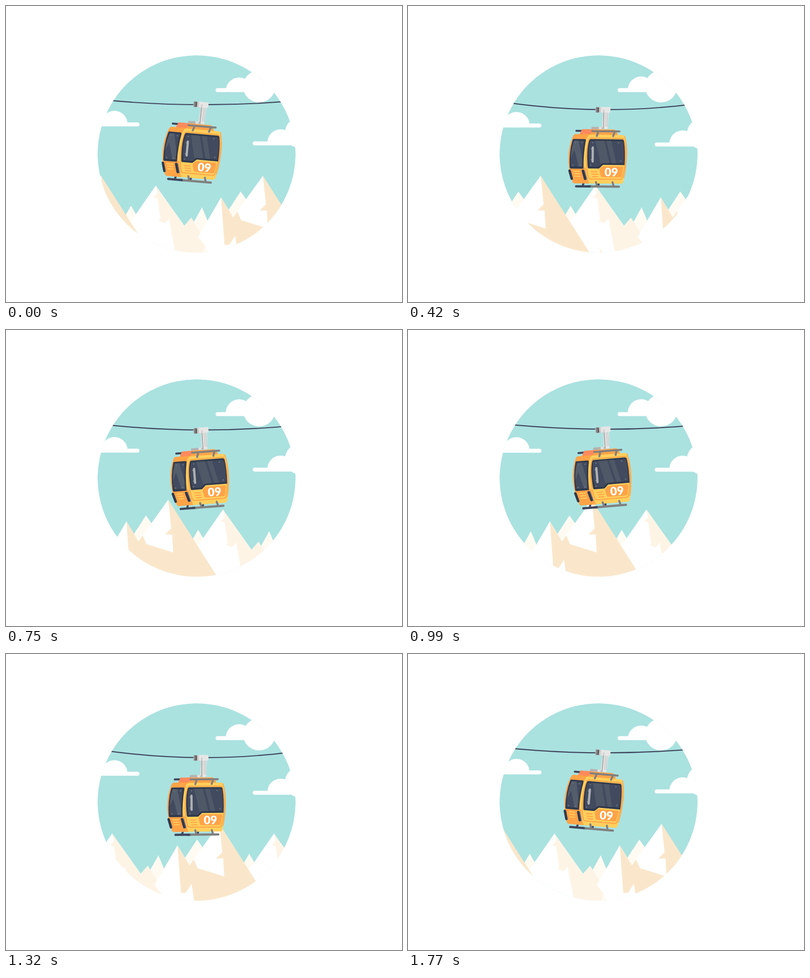
An HTML page for the animation above (1.8 s loop, 800 by 600 pixels).

```html
<!DOCTYPE html>
<html lang="en">
<head>
<meta charset="utf-8">
<title>Gondola</title>
<style>
html, body { margin: 0; width: 100%; height: 100%; overflow: hidden; background: #fff; }
svg { display: block; width: 800px; height: 600px; }
.l { fill: none; stroke-linecap: round; stroke-linejoin: round; }
</style>
</head>
<body>
<svg viewBox="0 0 800 600">
  <defs>
    <clipPath id="disc"><circle cx="385" cy="300" r="200"/></clipPath>
    <clipPath id="sideGlass"><path d="M336 273H356.5Q352.5 300 352.5 326H330.5Q327.5 298 336 273Z"/></clipPath>
    <clipPath id="frontGlass"><path d="M371 273H431.5Q435 273 435.700 278Q438 300 436.500 318.500H393.500L385.500 326H368.500Q363 299 368 276Q368.800 273 371 273Z"/></clipPath>
    <g id="far">
      <path fill="#fffbf3" d="M252.500 405L229 445H276ZM474 376L420 459H532ZM396 408L345 500H434Z"/>
      <path fill="#fff" d="M302.500 364L205 505H398L360 445Z"/>
      <path fill="#fef4e6" d="M302.500 364L360 445.500L374.500 429L395 462L402 485L396 505H343L329 431L321.500 440.500L309 436L312 431L306 390L298 388L306 379ZM310.500 488L316.500 500H312Z"/>
    </g>
    <g id="near">
      <path fill="#fff" d="M519 344L459 428L434.500 388L388 468L402 486L411 505H560Z"/>
      <path fill="#fae7cb" d="M519 344L621 505H469L463 466L451 484H441.500L434.500 388L459 428.500L467.500 416.500L475 434L529 451L527 414.500H512.500L525 402Z"/>
    </g>
  </defs>

  <g clip-path="url(#disc)">
    <circle cx="385" cy="300" r="200" fill="#aae2e0"/>
    <g id="mountains"></g>
    <g fill="#fff">
      <rect x="423.500" y="166.500" width="140" height="8" rx="4"/>
      <path d="M470 160H545V174H470Z"/>
      <circle cx="511.500" cy="163" r="32.500"/>
      <path id="puff" d="M444 172a27 27 0 0 1 54 0z"/>
      <g id="clouds">
        <rect x="150" y="236" width="119.500" height="8" rx="4"/>
        <path d="M192.500 239a26.500 26.500 0 0 1 53 0z"/>
        <rect x="498.500" y="274.500" width="120" height="8" rx="4"/>
        <path d="M528 277a27 27 0 0 1 54 0z"/>
        <circle cx="595" cy="257" r="31.500"/>
        <path d="M565 262H600V282H565Z"/>
      </g>
    </g>
    <path id="cable" class="l" stroke="#3f465c" stroke-width="2.200"/>
  </g>

  <g id="cabin">
    <!-- hanger -->
    <path fill="#e6e6e6" d="M393.500 214H405.500L404 249H392Z"/>
    <path fill="#b3b3b3" d="M394 210H397L396.500 249H391.500V246H394Z"/>
    <path class="l" stroke="#b8b8b8" stroke-width="1" d="M400 213V244M403 213V244"/>
    <rect x="378.500" y="205" width="12" height="11" rx="1.500" fill="#b3b3b3"/>
    <path fill="#808080" d="M380 205H384V216H380Z"/>
    <path fill="#4d4d4d" d="M383.500 205.500H385.500V215.500H383.500Z"/>
    <rect x="387.500" y="204.500" width="21.500" height="11.500" rx="1" fill="#e6e6e6"/>
    <path fill="#cfcfcf" d="M387.500 205H390V216H387.500ZM394 210H397V216H394Z"/>
    <rect x="371" y="245" width="16" height="6" rx="1.500" fill="#b3b3b3"/>
    <path fill="#e0e0e0" d="M386 245H392V250H386Z"/>

    <!-- roof -->
    <path class="l" stroke="#3f465c" stroke-width="4" d="M340.500 253.500H354"/>
    <path fill="#ff8a5c" d="M352 250H376L372 261H347Z"/>
    <path fill="#ffa347" d="M374 250H416Q419 250 421 253L425 262H368Z"/>

    <!-- landing skid -->
    <g class="l" stroke-width="4">
      <path stroke="#3f465c" d="M356.500 358L354.500 364M387 358L386 364"/>
      <path stroke="#3f465c" stroke-width="4.500" d="M341 366H372"/>
      <path stroke="#808080" stroke-width="4.500" d="M372 366H427.500"/>
      <path fill="#3f465c" stroke="none" d="M364 363.750H370V368.250H364Z"/>
    </g>

    <!-- shell -->
    <path fill="#ffa347" d="M339 260H372L366 360H337Q334.500 360 333 355Q325 331 325 310Q325 284 334 264Q336 260 339 260Z"/>
    <path fill="#ffcf5c" d="M369 261H433Q437 261 438.500 265Q443 284 442.500 305Q442 334 436 356Q435 360 431 360H362Q358 345 357 328Q354 290 363 266Q365 261 369 261Z"/>
    <path fill="#ffa347" d="M357 328L362 360H367Q361 343 360 328Z"/>
    <path class="l" stroke="#ffa347" stroke-width="2" d="M362 328Q364 343 366 348Q367 351 370 351H430Q433 351 434 348Q440 325 440 303Q440 285 436.500 271Q435.500 268 432 268H371Q367 268 366 272Q359 296 362 328"/>
    <path class="l" stroke="#ffa347" stroke-width="1.500" d="M438 263Q443.500 283 442.300 306Q441 332 437 348"/>

    <!-- windows -->
    <path fill="#30394c" d="M335 270H357Q360.500 270 359.800 273Q355 300 355.500 330H330Q328 330 327.700 327Q326 296 333 272Q333.500 270 335 270Z"/>
    <g clip-path="url(#sideGlass)">
      <path fill="#414a5e" d="M320 270H370V335H320Z"/>
      <path fill="#535d6c" d="M333 270H345L353 312V330H347L337 292L329 310Z"/>
    </g>
    <path fill="#30394c" d="M370 270H432.500Q436 270 436.800 273Q440 293 438.500 322H395L387 329.500H366Q364.500 329.500 364 326Q361 293 366.500 273Q367.500 270 370 270Z"/>
    <g clip-path="url(#frontGlass)">
      <path fill="#414a5e" d="M360 268H442V332H360Z"/>
      <path fill="#4e5867" d="M379 272H397L408 320H390ZM401 272H411L422 320H413Z"/>
    </g>
    <g id="bolts" fill="#667080"></g>
    <path class="l" stroke="#8b9299" stroke-width="2" d="M371 290H374M371 312H374"/>
    <path class="l" stroke="#aeb1b4" stroke-width="4.500" d="M374 287V315.500"/>

    <!-- lower panel -->
    <path fill="#ffa347" d="M396 325H433Q436 325 435.500 328L432.500 344Q432 347 429 347H394Q391.500 347 390.500 344L388 334Q387.500 331 390 329L393 326Q394 325 396 325Z"/>
    <text x="411.800" y="345" text-anchor="middle" fill="#fff" font-family="Lato, 'Open Sans', sans-serif" font-weight="900" font-size="23.500">09</text>
    <g class="l" stroke-width="2">
      <path stroke="#ffa347" d="M371 336H383M372.500 341H384M374 346H384.500"/>
      <path stroke="#ffcf5c" d="M336 335.500H347.500M337 340.500H348.500M338.500 345.500H349"/>
    </g>
    <g class="l" stroke-width="5">
      <path stroke="#808080" d="M356 335L360.500 350.500"/>
      <path stroke="#30394c" d="M327.500 334.500L332 350.500M354.500 334.500L359 350.500"/>
    </g>

    <!-- front rails -->
    <g class="l" stroke="#808080" stroke-width="4">
      <path d="M372.500 254H427.500M384.500 256L382 263.500M417.500 256L415 263.500"/>
      <path d="M381 357L383 364M414.500 357L416.500 364"/>
    </g>
  </g>
</svg>
<script>
const NS = "http://www.w3.org/2000/svg";
const LOOP = 1800, STEP = 30, TILE = 327, SPEED = 0.181;
const byId = id => document.getElementById(id);
const mountains = byId("mountains"), cabin = byId("cabin"), cable = byId("cable");
const clouds = byId("clouds"), puff = byId("puff");

function add(parent, tag, attrs) {
  const el = document.createElementNS(NS, tag);
  for (const key in attrs) el.setAttribute(key, attrs[key]);
  parent.appendChild(el);
}

for (const layer of ["far", "near"])
  for (let k = -2; k <= 1; k++) add(mountains, "use", { href: "#" + layer, x: k * TILE });

for (const [cx, cy] of [[339, 277], [352, 277], [334, 323], [348, 323], [374, 277], [426, 277], [370, 323], [431, 314]])
  add(byId("bolts"), "circle", { cx, cy, r: 1.5 });

const move = (el, x, y) => el.setAttribute("transform", `translate(${x} ${y})`);

function draw(t) {
  const swing = Math.cos(2 * Math.PI * t / LOOP);
  const hubY = 205.2 - 5 * Math.cos(4 * Math.PI * t / LOOP);
  const drift = 2.4 * (1 - swing);

  move(mountains, SPEED * t, 0);
  move(clouds, 0, drift);
  move(puff, 0, -drift);
  cabin.setAttribute("transform", `translate(0 ${hubY - 210}) rotate(${5 * swing} 400 210)`);

  // Parabola through the hub, written as one quadratic curve
  const sag = 2.45e-4 + (hubY - 200.3) * 1.15e-5;
  const rise = sag * 220 * 220;
  cable.setAttribute("d", `M180 ${hubY - rise}Q400 ${hubY + rise} 620 ${hubY - rise}`);
}

const start = performance.now();
function tick() {
  const t = (performance.now() - start) % LOOP;
  draw(Math.floor(t / STEP) * STEP);
  requestAnimationFrame(tick);
}
draw(0);
requestAnimationFrame(tick);
</script>
</body>
</html>
```
